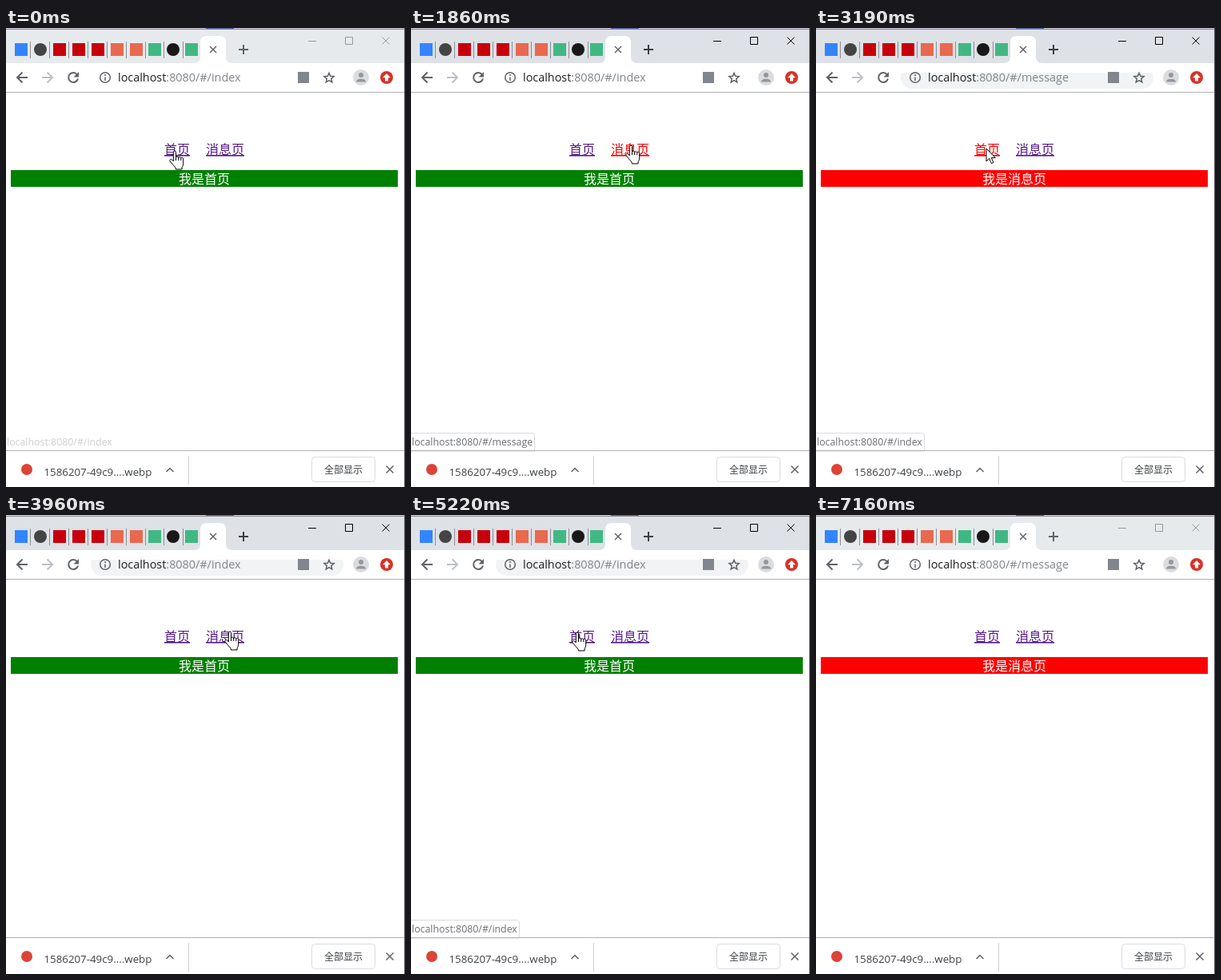
Write an HTML page that moves like this. It is 499 by 575 pixels and loops after 7560 ms.

```html
<!DOCTYPE html>
<html lang="zh">
<head>
<meta charset="utf-8">
<style>
html, body { margin: 0; width: 100%; height: 100%; overflow: hidden; background: #fff; }
svg { display: block; }
text { font-family: "Open Sans", sans-serif; white-space: pre; }
.cjk { font-family: "Noto Sans CJK SC", "Noto Sans CJK", sans-serif; font-size: 16px; }
.link { fill: #551a8b; text-decoration: underline 1px; }
.link.pressed { fill: #f00; }
.icon { fill: none; stroke: #5f6368; stroke-width: 2; }
.fine { stroke-width: 1.5; }
</style>
</head>
<body>
<svg width="499" height="575" viewBox="0 0 499 575">
  <rect width="499" height="575" fill="#fff"/>
  <rect id="titlebar" width="499" height="44"/>
  <path d="M0 .5H499" stroke="#d6cfe0"/>
  <path d="M250 .5H285" stroke="#5068a8"/>
  <path d="M0 1.5H499" stroke="#8b8496"/>
  <g id="tabs"></g>
  <path d="M235 44q8 0 8-8V18q0-8 8-8h16q8 0 8 8v18q0 8 8 8z" fill="#fff"/>
  <path class="icon fine" d="M255 23l8 8m0-8l-8 8"/>
  <path class="icon" id="plus" d="M291 27h12m-6-6v12"/>
  <path id="buttons" fill="none" d="M378 16.5h10M424.5 11.5h9v9h-9zM470.5 11.5l9 9m0-9l-9 9"/>

  <path id="pill" d="M107.4 56H420.6Q423 62 421 67Q417 76 408 76H120Q111 76 107 67Q105 62 107.4 56z" fill="#f1f3f4"/>
  <path class="icon" d="M27 62H14m6.5-6.5L14 62l6.5 6.5"/>
  <path class="icon" d="M45 62h13m-6.5-6.5L58 62l-6.5 6.5" style="stroke:#bdc1c6"/>
  <path class="icon" d="M89 58.5a6 6 0 1 0 1 5"/>
  <path d="M91 55v6.5h-6.5z" fill="#5f6368"/>
  <circle class="icon fine" cx="124" cy="62" r="6.3"/>
  <path class="icon fine" d="M124 58v2m0 1.5v4.5"/>
  <text x="140" y="67" font-size="14.4" fill="#202124">localhost<tspan id="url" fill="#80868b"></tspan></text>
  <rect x="365" y="55" width="14" height="14" fill="#80868b"/>
  <path class="icon fine" d="M404 56.3l1.7 4 4.4.4-3.3 2.9 1 4.3-3.8-2.3-3.8 2.3 1-4.3-3.3-2.9 4.4-.4z"/>
  <circle cx="444" cy="62" r="10" fill="#dadce0"/>
  <circle cx="444" cy="59" r="3" fill="#94979b"/>
  <path d="M438 67.5q0-3.8 6-3.8t6 3.8z" fill="#94979b"/>
  <circle cx="476" cy="62" r="8" fill="#d93025"/>
  <path d="M476 57l5 5.3h-3v4.2h-4v-4.2h-3z" fill="#fff"/>
  <path d="M0 80.5H499" stroke="#b0b2b5"/>

  <text class="cjk link" id="indexLink" x="198" y="158">首页</text>
  <text class="cjk link" id="messageLink" x="250" y="158">消息页</text>
  <rect id="banner" x="6" y="178" width="484" height="21"/>
  <text class="cjk" id="label" x="248" y="195" fill="#fff" text-anchor="middle"></text>

  <g id="status">
    <path id="bubble" fill="#fff" stroke="#dadce0"/>
    <text id="statusText" x="1" y="523" font-size="12.37"></text>
  </g>

  <path d="M0 529.5H499" stroke="#b0b2b5"/>
  <circle cx="26" cy="553" r="7" fill="#db4437"/>
  <text x="47.5" y="561" font-size="13.3" fill="#3c4043">1586207-49c9....webp</text>
  <path class="icon fine" d="M200.5 556l4.5-4.5 4.5 4.5"/>
  <path d="M228.5 536V572" stroke="#d0d2d5"/>
  <rect x="382.5" y="537.5" width="79" height="31" rx="4" fill="#fff" stroke="#dadce0"/>
  <text class="cjk" x="398" y="557.5" style="font-size:12px" fill="#3c4043">全部显示</text>
  <path class="icon fine" d="M475.5 548.5l9 9m0-9l-9 9"/>
  <path d="M498.5 0V575" stroke="#5c5c64"/>

  <g id="cursor" fill="#fff" stroke="#000">
    <path id="hand" d="M-1.7 12.8V1.6a1.6 1.6 0 0 1 3.2 0V8.5a1.6 1.6 0 0 1 3.2 .3a1.6 1.6 0 0 1 3.1 .5a1.5 1.5 0 0 1 2.9 .5V16.2q0 2-1.6 4.5V23H1.2V21.2Q-2.5 17-6 12.8a1.6 1.6 0 0 1 2.4-2ZM1.5 8.5v3.5M4.7 8.8v3.2M7.8 9.3v2.7"/>
    <path id="arrow" d="M0 0V16l3.7-3.5 2.6 6.2 2.6-1.1-2.6-6h5z"/>
  </g>
</svg>
<script>
const LOOP = 7560;
const $ = id => document.getElementById(id);
const show = (id, on) => $(id).setAttribute("visibility", on ? "visible" : "hidden");
const set = (id, attrs) => { for (const k in attrs) $(id).setAttribute(k, attrs[k]); };

// Screen refreshes: first time, last time, count
const steps = [
  [0, 120, 2], [270, 1040, 6], [1190, 1590, 4], [1860, 1990, 2], [2120, 2800, 6],
  [2950, 3190, 3], [3330, 3960, 6], [4110, 4790, 6], [5070, 5220, 2],
  [5340, 5780, 4], [5930, 6070, 2], [6200, 6350, 2], [7010, 7160, 2]
].flatMap(([a, b, n]) => Array.from({ length: n }, (_, i) => Math.round(a + (b - a) * i / (n - 1))));

// Time, shown page, status page, pressed link
const states = [
  [0, "index", "index", ""],
  [400, "index", "index", "index"],
  [560, "index", "index", ""],
  [1310, "index", "message", ""],
  [1860, "index", "message", "message"],
  [1990, "message", "message", ""],
  [2780, "message", "index", ""],
  [3190, "message", "index", "index"],
  [3330, "index", "index", ""],
  [3700, "index", "", ""],
  [4110, "index", "message", ""],
  [4240, "index", "message", "message"],
  [4380, "message", "message", ""],
  [4780, "message", "index", ""],
  [5070, "message", "index", "index"],
  [5220, "index", "index", ""],
  [5630, "index", "message", "message"],
  [5780, "message", "message", ""],
  [6350, "message", "", ""]
];

// Time and hot spot of the pointer
const path = [
  [0, 211, 154], [900, 210, 153], [1460, 275, 147], [2120, 275, 147],
  [2900, 213, 151], [3450, 213, 151], [3960, 280, 146], [4390, 280, 147],
  [4790, 208, 147], [5220, 208, 147], [5630, 283, 153], [5930, 283, 153],
  [6070, 419, 505], [6200, 411, 539]
];

const pages = {
  index: { color: "#008000", label: "我是首页", bubble: 135.5 },
  message: { color: "#ff0000", label: "我是消息页", bubble: 154.5 }
};

const latest = (list, t) => list.findLast(item => item[0] <= t);

function pointerAt(t) {
  const i = path.findIndex(p => p[0] > t);
  if (i < 0) return path.at(-1).slice(1);
  const [t0, x0, y0] = path[i - 1], [t1, x1, y1] = path[i];
  const u = (t - t0) / (t1 - t0), k = u * u * (3 - 2 * u);
  return [Math.round(x0 + (x1 - x0) * k), Math.round(y0 + (y1 - y0) * k)];
}

function buildTabs() {
  const square = (x, color) => `<rect x="${x}" y="19" width="16" height="16" fill="${color}"/>`;
  const circle = (x, color) => `<circle cx="${x}" cy="27" r="8" fill="${color}"/>`;
  const dividers = [30, 54, 78, 102, 126, 150, 174, 197, 221].map(x => `M${x}.5 17v21`).join("");
  $("tabs").innerHTML =
    square(11, "#3385ff") + circle(43, "#444") +
    [59, 83, 107].map(x => square(x, "#c7000b")).join("") +
    [131, 155].map(x => square(x, "#e8694f")).join("") +
    [178, 224].map(x => square(x, "#41b883")).join("") +
    circle(209, "#191717") + `<path d="${dividers}" stroke="#8c8f94"/>`;
}

function draw(now) {
  const t = steps.findLast(s => s <= now);
  const [, page, status, pressed] = latest(states, t);
  const { color, label } = pages[page];
  const active = t >= 400 && t < 7010;

  set("titlebar", { fill: active ? "#dee1e6" : "#e7eaed" });
  set("buttons", { stroke: active ? "#000" : "#999" });
  $("plus").style.stroke = active ? "#3c4043" : "#5f6368";
  show("pill", t >= 1990 && t < 7010);
  $("url").textContent = ":8080/#/" + page;
  set("banner", { fill: color });
  $("label").textContent = label;
  for (const name in pages) $(name + "Link").classList.toggle("pressed", name === pressed);

  const fading = t < 120;
  show("status", status);
  if (status) {
    const w = pages[status].bubble;
    set("bubble", { d: `M-1 507.5H${w - 3}q3 0 3 3V530H-1z`, "stroke-opacity": fading ? 0 : 1 });
    set("statusText", { fill: fading ? "#cfcfcf" : "#6b6e72" });
    $("statusText").textContent = "localhost:8080/#/" + status;
  }

  const [x, y] = pointerAt(t);
  const overLink = y > 140 && y < 164 && (x >= 198 && x <= 230 || x >= 250 && x <= 298);
  const visible = t < 6350, hand = overLink && !(t >= 2800 && t < 3330);
  set("cursor", { transform: `translate(${x} ${y})` });
  show("hand", visible && hand);
  show("arrow", visible && !hand);
}

buildTabs();
const start = performance.now();
function tick() {
  draw((performance.now() - start) % LOOP);
  requestAnimationFrame(tick);
}
tick();
</script>
</body>
</html>
```
